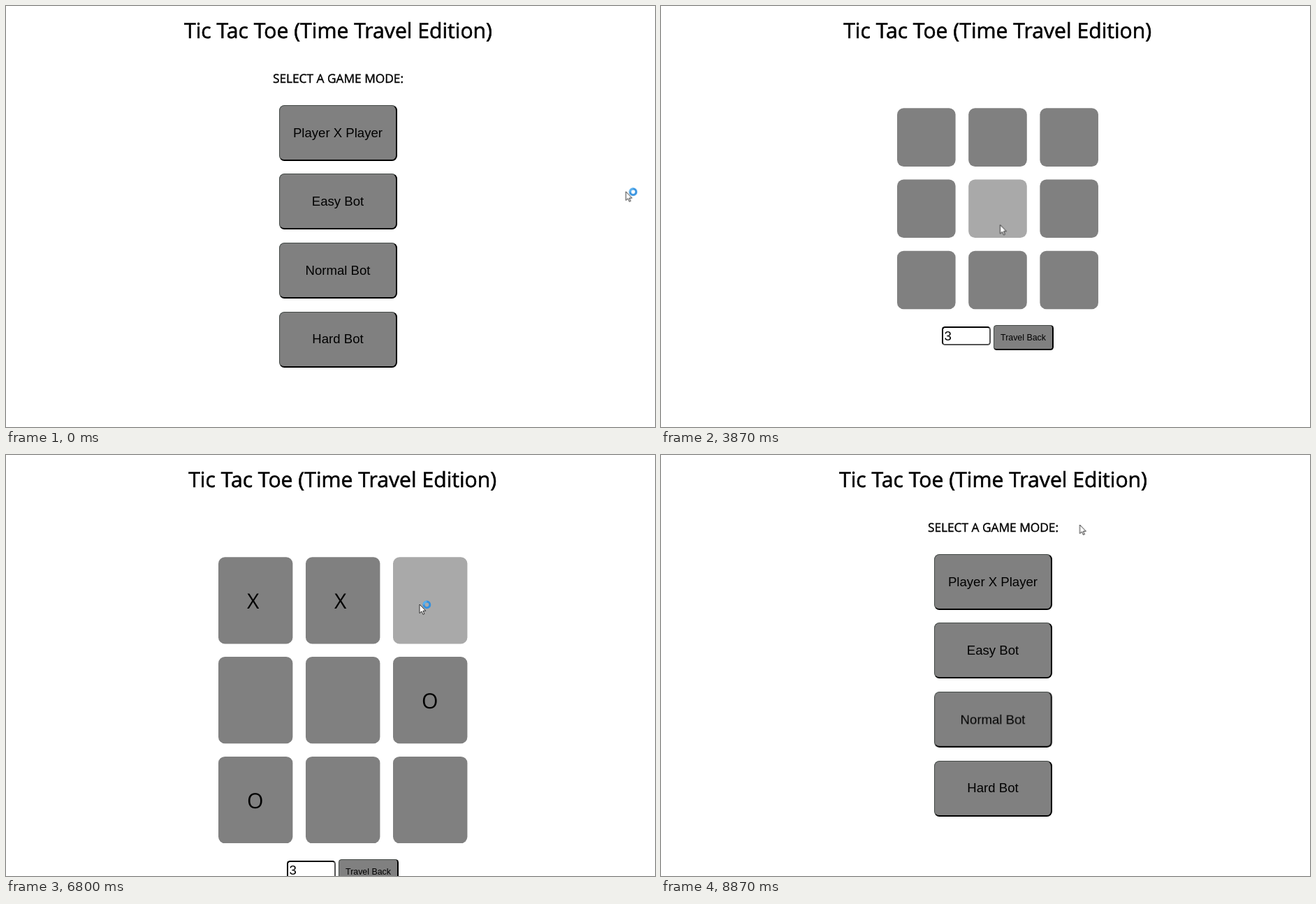
An HTML page that plays this animation: 929x603 px, repeating every 8940 ms.

```html
<!DOCTYPE html>
<html lang="en">
<head>
<meta charset="utf-8">
<title>Tic Tac Toe</title>
<style>
html, body { margin: 0; width: 100%; height: 100%; overflow: hidden; background: #fff; }
#stage { position: absolute; left: 0; top: 0; width: 929px; height: 603px; overflow: hidden; }
#stage * { animation-duration: 8.94s; animation-iteration-count: infinite; animation-timing-function: step-end; }
svg, .layer { position: absolute; left: 0; top: 0; width: 929px; height: 603px; }
text { font-family: "Open Sans", "Noto Sans", sans-serif; text-rendering: geometricPrecision; }
.mid { text-anchor: middle; }
.title { font-size: 30.15px; stroke: #000; stroke-width: .6px; }
.sub { font-size: 17.3px; stroke: #000; stroke-width: .4px; }
.mark { font-size: 30.15px; }
.cell { fill: #808080; }

.btn, .field {
  position: absolute; box-sizing: border-box; color: #000;
  font-family: Arial, "Liberation Sans", sans-serif;
}
.btn {
  display: flex; align-items: center; justify-content: center;
  background: #808080; border: solid; border-width: 1px 2px 2px 1px;
  border-color: #444a47 #000 #000 #444a47; white-space: nowrap;
}
.mode { left: 391px; width: 169px; height: 80px; border-radius: 7.5px; font-size: 18.58px; }
.back { left: 476px; top: 457px; width: 86px; height: 36px; border-radius: 4.6px; font-size: 12.38px; }
.field {
  left: 402px; top: 459px; width: 70px; height: 27px; padding-left: 1.5px;
  border: 2px inset #000; border-radius: 4.6px; background: #fff;
  font-size: 18.58px; line-height: 23px;
}

/* scenes */
.menu { animation-name: menu; }
.board { animation-name: board; }
.small { animation-name: small; }
.big { animation-name: big; }
.turn2 { animation-name: turn2; }
.turn3 { animation-name: turn3; }
.alert { animation-name: alert; }
.controls { animation-name: drop; }
.grow { animation-name: grow; }
@keyframes menu { 0% { opacity: 1 } 38.03% { opacity: 0 } 91.72% { opacity: 1 } }
@keyframes board { 0% { opacity: 0 } 38.03% { opacity: 1 } 91.72% { opacity: 0 } }
@keyframes small { 0% { opacity: 1 } 48.43% { opacity: 0 } }
@keyframes big { 0% { opacity: 0 } 48.43% { opacity: 1 } }
@keyframes turn2 { 0% { opacity: 0 } 60.4% { opacity: 1 } }
@keyframes turn3 { 0% { opacity: 0 } 79.87% { opacity: 1 } }
@keyframes alert { 0% { opacity: 0 } 82% { opacity: 1 } 91.72% { opacity: 0 } }
@keyframes drop { 0% { transform: none } 48.43% { transform: translateY(122px) } }
@keyframes grow {
  0% { transform: none }
  31.5% { transform: scale(1); animation-timing-function: ease }
  32.7% { transform: scale(1.1) }
  38.03% { transform: none }
}

/* hovered cells */
.small .c7 { animation-name: s7; }
.small .c4 { animation-name: s4; }
.small .c0 { animation-name: s0; }
.big .c0 { animation-name: b0; }
.big .c1 { animation-name: b1; }
.big .c2 { animation-name: b2; }
@keyframes s7 { 0% { fill: #a9a9a9 } 39.9% { fill: #808080 } }
@keyframes s4 { 0% { fill: #808080 } 40.9% { fill: #a9a9a9 } 45.6% { fill: #808080 } }
@keyframes s0 { 0% { fill: #808080 } 46.6% { fill: #a9a9a9 } }
@keyframes b0 { 0% { fill: #a9a9a9 } 55.4% { fill: #808080 } }
@keyframes b1 { 0% { fill: #808080 } 56.35% { fill: #a9a9a9 } 74.6% { fill: #808080 } }
@keyframes b2 { 0% { fill: #808080 } 74.6% { fill: #a9a9a9 } }

/* pointer */
#stage .pointer { animation-name: move; animation-timing-function: linear; }
.busy { animation-name: busy; }
@keyframes busy { 0% { opacity: 1 } 3.69% { opacity: 0 } 48.43% { opacity: 1 } 79.87% { opacity: 0 } }
@keyframes move {
  0%, 3.69% { transform: translate(887.3px, 265.8px) }
  5.26% { transform: translate(888px, 277px) }
  24.61% { transform: translate(888px, 277px); animation-timing-function: ease-in-out }
  34.34%, 35.8% { transform: translate(490px, 375px) }
  40.27% { transform: translate(486px, 345px) }
  43.29%, 43.96% { transform: translate(485.5px, 313.5px) }
  47.76%, 53.69% { transform: translate(375px, 205px) }
  57.38% { transform: translate(450px, 211.5px) }
  59.28%, 64.09% { transform: translate(471px, 211.5px) }
  69.35% { transform: translate(580px, 345px) }
  73.83% { transform: translate(594px, 216px) }
  75.28%, 79.08% { transform: translate(592px, 214px) }
  83.89% { transform: translate(645px, 150px) }
  88.7%, 89.4% { transform: translate(596px, 79px) }
  90.94%, 91.72% { transform: translate(606px, 64px) }
  99.2%, 100% { transform: translate(599.5px, 100px) }
}
</style>
</head>
<body>
<div id="stage">
  <div class="layer menu">
    <svg>
      <text class="title mid" x="475.5" y="45.7">Tic Tac Toe (Time Travel Edition)</text>
      <text class="sub mid" x="475.5" y="110">SELECT A GAME MODE:</text>
    </svg>
    <div class="btn mode" style="top:142px">Player X Player</div>
    <div class="btn mode" style="top:240.4px">Easy Bot</div>
    <div class="btn mode grow" style="top:339px">Normal Bot</div>
    <div class="btn mode" style="top:437.6px">Hard Bot</div>
  </div>

  <div class="layer board">
    <svg>
      <text class="title mid" x="481.7" y="45.7">Tic Tac Toe (Time Travel Edition)</text>
      <g class="small"></g>
      <g class="big"></g>
    </svg>
    <div class="controls layer">
      <div class="field">3</div>
      <div class="btn back">Travel Back</div>
    </div>
  </div>

  <svg class="alert">
    <rect x="314" y="-20" width="336" height="113.5" rx="10" fill="#000" opacity=".18"/>
    <rect x="315.5" y="-20" width="333" height="111.8" rx="9" fill="#1f1f1f"/>
    <text x="330.5" y="11" font-size="11.2" font-weight="600" fill="#e8e8e8">localhost:63342 says</text>
    <text x="330.5" y="32.7" font-size="9.2" fill="#e3e3e3">Player X has WON!</text>
    <rect x="584" y="46.2" width="51" height="32.6" rx="16.3" fill="none" stroke="#a8c7fa" stroke-width="1.8"/>
    <rect x="586.3" y="48.3" width="46.4" height="28.4" rx="14.2" fill="#a8c7fa"/>
    <text class="mid" x="609.5" y="65.8" font-size="9.2" fill="#062e6f">OK</text>
  </svg>

  <svg>
    <g class="pointer">
      <path d="M0 0V12.6L2.9 9.9L5 14.4L6.9 13.5L4.9 9.2H8.8Z" fill="#fff" stroke="#111" stroke-width=".85"/>
      <g class="busy" fill="none" stroke-width="3">
        <circle cx="10.4" cy=".4" r="4.4" stroke="#3391df"/>
        <path d="M6 .4A4.4 4.4 0 0 1 10.4 -4" stroke="#58b0ee"/>
      </g>
    </g>
  </svg>
</div>
<script>
const grid = (x, y, w, h, gap) => Array.from({ length: 9 }, (_, i) => {
  const cx = x + (i % 3) * (w + gap), cy = y + Math.floor(i / 3) * (h + gap);
  return `<rect class="cell c${i}" x="${cx}" y="${cy}" width="${w}" height="${h}" rx="9.3"/>`;
}).join("");

const mark = (s, i) =>
  `<text class="mark" x="${345 + (i % 3) * 125}" y="${219.9 + Math.floor(i / 3) * 142.8}">${s}</text>`;
const turn = (n, x, o) => `<g class="turn${n}">${mark("X", x)}${mark("O", o)}</g>`;

document.querySelector(".small").innerHTML = grid(338, 146.3, 83.6, 83.6, 18.58);
document.querySelector(".big").innerHTML =
  grid(304, 146.3, 106.4, 124.2, 18.6) + turn(1, 0, 6) + turn(2, 1, 5) + turn(3, 2, 3);
</script>
</body>
</html>
```
